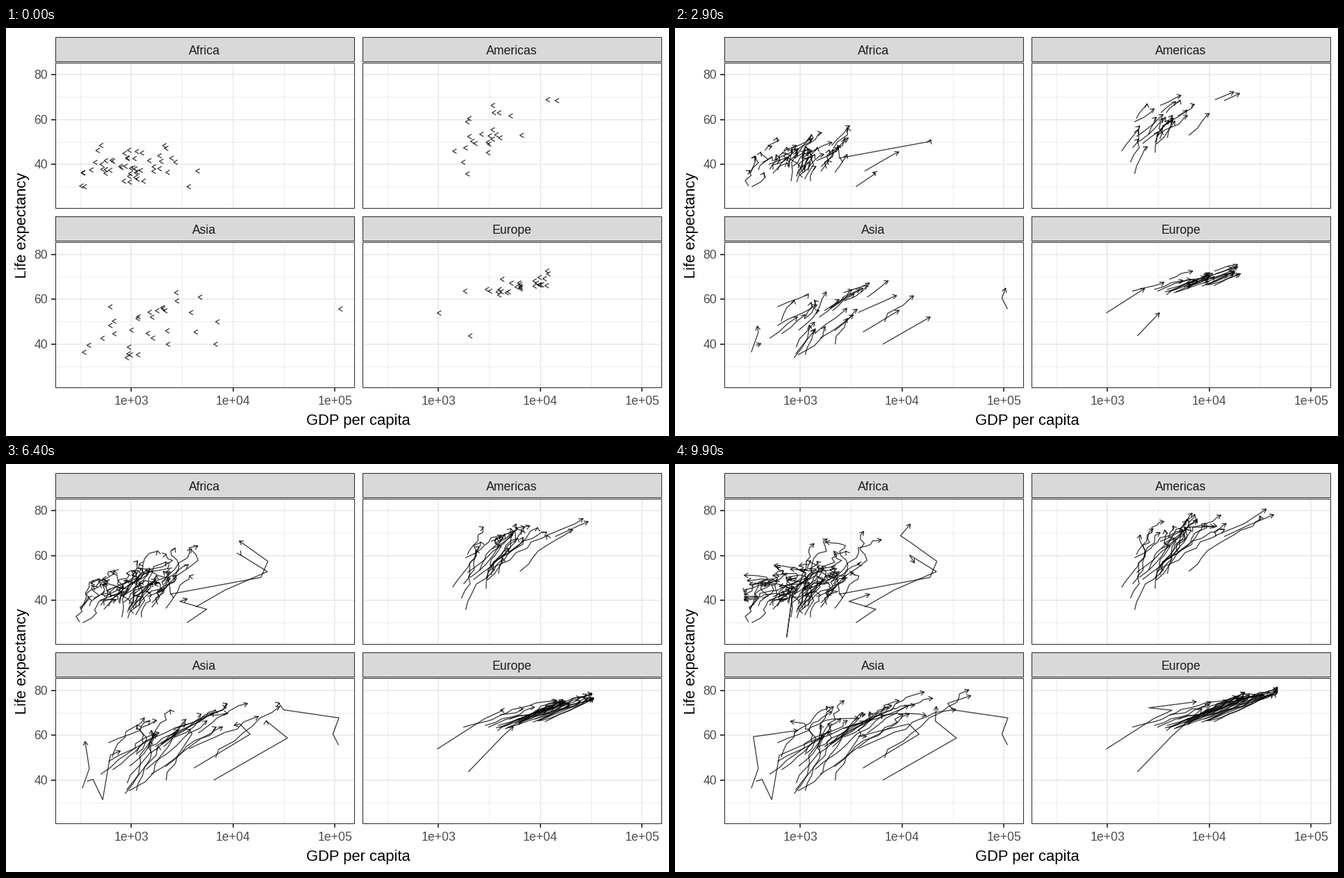
A matplotlib script that plays this animation: 954 px wide and 587 px high, repeating every 10000 ms.

```python
import numpy as np
import matplotlib.pyplot as plt
from matplotlib.animation import FuncAnimation
from matplotlib.collections import LineCollection
from matplotlib.patches import Rectangle

W, H, FRAMES, STEP = 954, 587, 100, 9
YEARS = np.arange(1952, 2008, 5)
U = np.linspace(0, 1, len(YEARS))
ARCH = np.sin(np.pi * U)
DX, DY = 442, 258.5
PANEL_W, PANEL_H, STRIP_H = 430, 209, 35
HEAD = 6.6

plt.rcParams["font.family"] = "Liberation Sans"
fig = plt.figure(figsize=(W / 72, H / 72), dpi=72, facecolor="white")
ax = fig.add_axes([0, 0, 1, 1])
ax.set(xlim=(0, W), ylim=(H, 0))
ax.axis("off")
rng = np.random.default_rng(7)
trails = []


def px(log_gdp, col=0):
    return 70 + DX * col + (log_gdp - 2.2487) * 146.6


def py(life, row=0):
    return 49.2 + DY * row + (85.55 - life) * 3.225


def add_trail(col, row, log_gdp, life):
    trails.append(np.column_stack([px(log_gdp, col), py(life, row)]))


def keyed(col, row, *keys):
    """A distinctive trail through a few (year, gdp, life) keys."""
    years, gdp, life = np.array(keys, float).T
    add_trail(col, row, np.interp(YEARS, years, np.log10(gdp)), np.interp(YEARS, years, life))


def swarm(col, row, n, start, life, rise, goal, bulge, bump, walk):
    """n trails that grow from a random cloud to a random goal.

    start: mean, spread and limits of log gdp; rise: mean and spread of its growth.
    life, goal: level, slope against log gdp and spread of first and last life expectancy.
    bulge, bump: how far each trail arches in log gdp and life; walk: its roughness.
    """
    mean, sd, low, high = start
    for _ in range(n):
        x0 = np.clip(rng.normal(mean, sd), low, high)
        x1 = np.clip(x0 + rng.normal(*rise), 2.45, 4.67)
        level, slope, spread = life
        y0 = np.clip(level + slope * (x0 - mean) + rng.normal(0, spread), 30, 72.5)
        level, slope, spread = goal
        y1 = np.clip(level + slope * (x1 - mean - rise[0]) + rng.normal(0, spread), 40, 82)
        drift = np.cumsum(rng.normal(0, walk, len(U)))
        drift -= drift[0] + (drift[-1] - drift[0]) * U
        wobble = rng.normal(0, .4, len(U)) * ARCH
        add_trail(col, row, x0 + (x1 - x0) * U + bulge * ARCH + drift,
                  y0 + (y1 - y0) * U + bump * ARCH + wobble)


swarm(0, 0, 48, start=(2.98, .27, 2.48, 3.55), life=(39.5, 7, 4.8), rise=(.17, .27),
      goal=(54, 13, 7), bulge=.1, bump=4.5, walk=.04)
swarm(1, 0, 23, start=(3.46, .16, 3.14, 3.8), life=(53.5, 18, 6.5), rise=(.41, .18),
      goal=(73.5, 6, 2.5), bulge=.07, bump=3, walk=.03)
swarm(0, 1, 28, start=(3.15, .32, 2.7, 4), life=(46.5, 14, 7), rise=(.66, .27),
      goal=(71, 8, 3), bulge=.05, bump=3.5, walk=.03)
swarm(1, 1, 28, start=(3.75, .2, 3.2, 4.17), life=(66, 13, 1.8), rise=(.64, .13),
      goal=(77.5, 10, 1), bulge=.09, bump=1.5, walk=.02)

keyed(0, 0, (1952, 2388, 42.7), (1967, 18773, 50.2), (1977, 21951, 57.4), (1987, 11771, 66.2),
      (1992, 9640, 68.8), (2007, 12057, 74))
keyed(0, 0, (1952, 4293, 37), (1967, 8359, 44.6), (1977, 21746, 52.8), (1987, 11864, 60.2),
      (2007, 13206, 56.7))
keyed(0, 0, (1952, 3521, 30), (1967, 5523, 36), (1977, 3009, 39.5), (2007, 4797, 42.7))
keyed(0, 0, (1952, 493, 40), (1987, 848, 44), (1992, 737, 23.6), (2007, 863, 46.2))
keyed(1, 0, (1952, 13990, 68.4), (1977, 24073, 73.4), (2007, 42952, 78.2))
keyed(1, 0, (1952, 11367, 68.8), (1977, 22091, 74.2), (2007, 36319, 80.7))
keyed(0, 1, (1952, 108382, 55.6), (1962, 95458, 60.5), (1972, 109348, 67.7), (1982, 31354, 71.3),
      (1987, 28118, 74.2), (2007, 47307, 77.6))
keyed(0, 1, (1952, 6460, 39.9), (1977, 34168, 58.7), (1987, 21198, 66.3), (2007, 21655, 72.8))
keyed(0, 1, (1952, 4130, 45.3), (1977, 14688, 60.4), (1987, 11644, 65), (1992, 3746, 59.5),
      (2007, 4471, 59.5))
keyed(0, 1, (1952, 368, 39.4), (1972, 422, 40.3), (1977, 525, 31.2), (1982, 624, 51), (2007, 1714, 59.7))
keyed(0, 1, (1952, 331, 36.3), (1962, 388, 45.1), (1992, 347, 59.3), (2007, 944, 62.1))
keyed(1, 1, (1952, 974, 53.8), (1972, 2860, 67.4), (1987, 4314, 71.1), (1992, 2547, 72.2),
      (2007, 7446, 74.9))
keyed(1, 1, (1952, 1969, 43.6), (1977, 4269, 59.5), (2007, 8458, 71.8))


def line(x, y, color, width):
    ax.plot(x, y, color=color, lw=width, solid_capstyle="butt")


def label(x, y, text, size=17.6, color="#4d4d4d", ha="center", **kw):
    ax.text(x, y, text, size=size, color=color, ha=ha, va="baseline", **kw)


def box(x, y, h, fill):
    ax.add_patch(Rectangle((x, y), PANEL_W, h, fc=fill, ec="#333333", lw=1.1, zorder=3))


def panel(col, row, title):
    left, top = 70.5 + DX * col, 49.5 + 258 * row
    right, bottom = left + PANEL_W, top + PANEL_H
    for width, logs, lives in ((1, (2.5, 3.5, 4.5), (30, 50, 70)), (1.9, (3, 4, 5), (40, 60, 80))):
        for v in logs:
            line([px(v, col)] * 2, [top, bottom], "#ebebeb", width)
        for v in lives:
            line([left, right], [py(v, row)] * 2, "#ebebeb", width)
    box(left, top, PANEL_H, "none")
    strip = top - STRIP_H - 2
    box(left, strip, STRIP_H, "#d9d9d9")
    label(left + PANEL_W / 2, strip + 25, title, color="#1a1a1a", zorder=4)
    if col == 0:
        for v in (40, 60, 80):
            line([left - 6, left], [py(v, row)] * 2, "#333333", 1.8)
            label(60, py(v, row) + 6.3, str(v), ha="right")
    if row == 1:
        for v in (3, 4, 5):
            line([px(v, col)] * 2, [bottom, bottom + 6], "#333333", 1.8)
            label(px(v, col), 541.5, f"1e+0{v}")


panel(0, 0, "Africa")
panel(1, 0, "Americas")
panel(0, 1, "Asia")
panel(1, 1, "Europe")
label(506.5, 571, "GDP per capita", 22, "black")
label(29, 283.5, "Life expectancy", 22, "black", rotation=90, rotation_mode="anchor")

style = dict(colors=[(0, 0, 0, .75)], linewidths=1.35, zorder=2.5)
paths = LineCollection([], **style)
heads = LineCollection([], **style)
ax.add_collection(paths, autolim=False)
ax.add_collection(heads, autolim=False)


def arrow(tip, angle):
    barbs = angle + np.pi + np.radians([-30, 30])
    a, b = tip + HEAD * np.column_stack([np.cos(barbs), np.sin(barbs)])
    return np.array([a, tip, b])


def update(i):
    k, part = divmod(i, STEP)
    resting = part == 0 and i < FRAMES - 1
    lines, tips = [], []
    for p in trails:
        pts = p[:k + 1]
        if part:
            pts = np.vstack([pts, p[k] + (p[k + 1] - p[k]) * part / STEP])
        if len(pts) > 1:
            lines.append(pts)
        # a trail that sits on a survey year has no heading: its head points left
        angle = np.pi if resting else np.arctan2(*(pts[-1] - pts[-2])[::-1])
        tips.append(arrow(pts[-1], angle))
    paths.set_segments(lines)
    heads.set_segments(tips)
    return paths, heads


anim = FuncAnimation(fig, update, frames=FRAMES, interval=100, repeat=True, repeat_delay=0)
plt.show()
```
